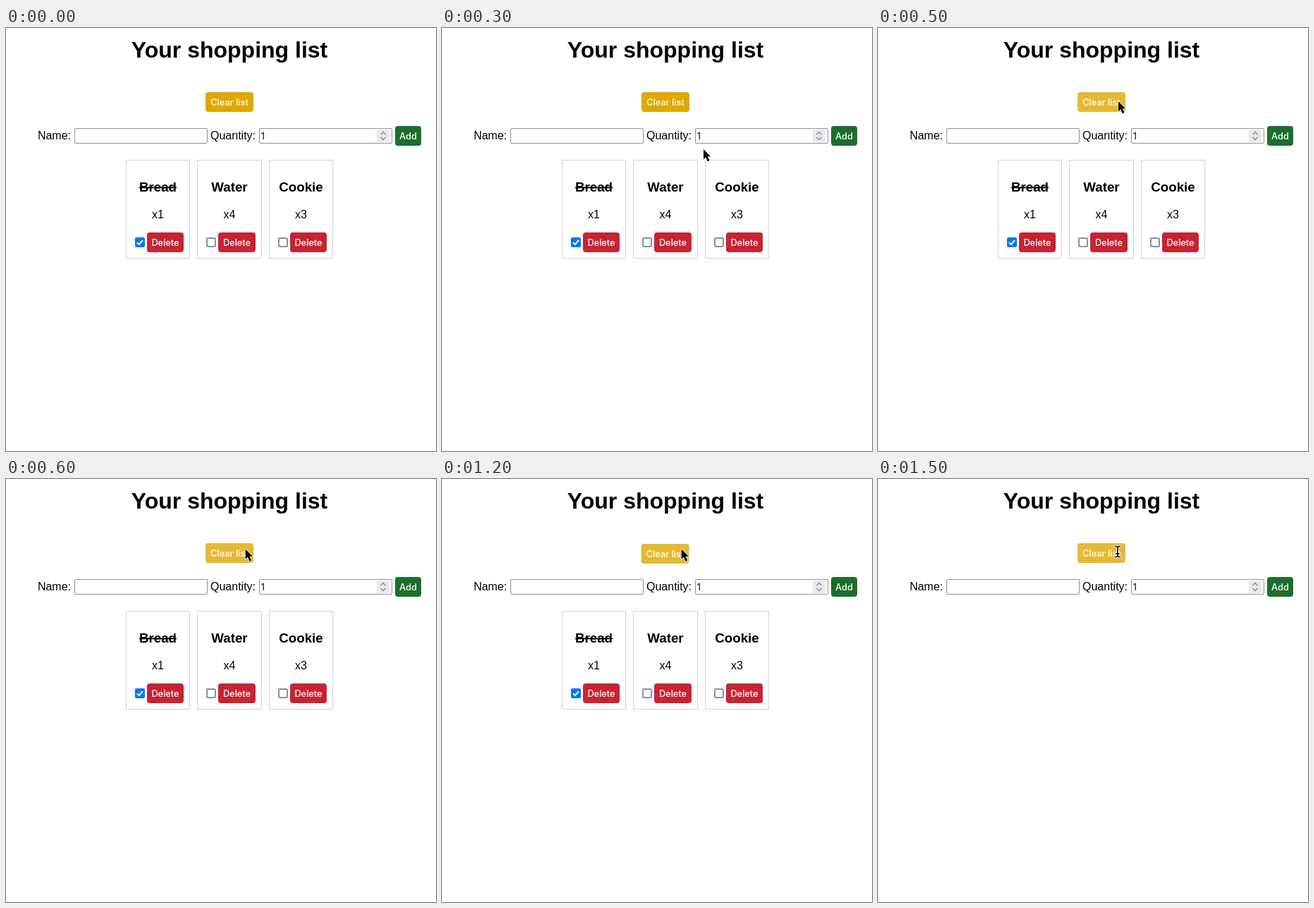
An HTML page for the animation above (1850 ms loop, 610 px wide and 600 px high).

```html
<!DOCTYPE html>
<html lang="en">
<head>
<meta charset="utf-8">
<title>Shopping list</title>
<style>
  html, body { margin: 0; width: 100%; height: 100%; overflow: hidden; background: #fff; }
  svg { display: block; width: 610px; height: 600px; }
  text { font: 16px "Liberation Sans", Arial, sans-serif; }
  .title { font-size: 32px; font-weight: bold; }
  .item { font-size: 18.72px; font-weight: bold; }
  .done { text-decoration: line-through; }
  .ui { font: 500 12.8px Inter, Roboto, sans-serif; }
  .value { font-weight: 400; }
  .mid { text-anchor: middle; }
  .field { fill: #fff; stroke: #8f8f9d; }
</style>
</head>
<body>
<svg id="stage" viewBox="0 0 610 600" xmlns="http://www.w3.org/2000/svg"></svg>
<script>
const LOOP = 1850;
const stage = document.getElementById('stage');

function add(parent, tag, attrs, content) {
  const el = document.createElementNS('http://www.w3.org/2000/svg', tag);
  for (const key in attrs) el.setAttribute(key, attrs[key]);
  if (content) el.textContent = content;
  parent.appendChild(el);
  return el;
}

const label = (parent, x, y, content, cls = '') =>
  add(parent, 'text', { x, y, class: cls }, content);

function button(parent, x, y, width, fill, content) {
  const g = add(parent, 'g');
  add(g, 'rect', { x, y, width, height: 28, rx: 4, fill });
  label(g, x + width / 2, y + 18.6, content, 'ui mid').setAttribute('fill', '#fff');
  return g;
}

const field = x =>
  add(stage, 'rect', { x: x + .5, y: 142.5, width: 188, height: 21, rx: 1.5, class: 'field' });

function checkbox(parent, x, y, checked) {
  if (!checked) {
    add(parent, 'rect', { x: x + 1, y: y + 1, width: 12, height: 12, rx: 1.5,
      fill: '#fff', stroke: '#8f8f9d', 'stroke-width': 2 });
    return;
  }
  add(parent, 'rect', { x, y, width: 14, height: 14, rx: 2, fill: '#0075ff' });
  add(parent, 'path', { d: `M${x + 3} ${y + 7.2}l2.8 2.8l5.2-6`,
    fill: 'none', stroke: '#fff', 'stroke-width': 2 });
}

function card(parent, x, width, name, count, checked) {
  const g = add(parent, 'g');
  const center = x + width / 2;
  add(g, 'rect', { x: x + .5, y: 187.5, width: width - 1, height: 139, fill: '#fff', stroke: '#d3d3d3' });
  label(g, center, 232, name, checked ? 'item mid done' : 'item mid');
  label(g, center, 270, 'x' + count, 'mid');
  checkbox(g, x + 13, 297, checked);
  return button(g, x + 30, 290, width > 91 ? 53 : 52, '#c82333', 'Delete');
}

label(stage, 317, 42, 'Your shopping list', 'title mid');
const clearButton = button(stage, 283, 91, 68, '#e0a800', 'Clear list');

label(stage, 44.9, 158, 'Name:');
field(97);
label(stage, 290, 158, 'Quantity:');
field(359);
label(stage, 361.8, 157.8, '1', 'ui value');
add(stage, 'rect', { x: 526, y: 144, width: 18, height: 18, rx: 1, fill: '#e9e9ed' });
add(stage, 'path', { d: 'M531.5 151l3.5-3.5l3.5 3.5M531.5 155l3.5 3.5l3.5-3.5',
  fill: 'none', stroke: '#8f8f94', 'stroke-width': 1.5 });
button(stage, 552, 139, 37, '#1b6e2d', 'Add');

const cards = add(stage, 'g');
card(cards, 170, 91, 'Bread', 1, true);
card(cards, 271, 92, 'Water', 4, false);
const lastDelete = card(cards, 373, 91, 'Cookie', 3, false);

const arrow = add(stage, 'path', {
  d: 'M0 0V14.2L3.2 11.2L5.8 17.2L8.5 16L5.9 10.2H10.2Z',
  fill: '#000', stroke: '#fff', 'stroke-width': 1.6, 'stroke-linejoin': 'round', 'paint-order': 'stroke'
});

const beam = add(stage, 'g', { fill: 'none' });
for (const [stroke, width] of [['#fff', 3.6], ['#000', 1.6]]) {
  add(beam, 'path', {
    d: 'M336.5 95.5H338.5L340 97L341.5 95.5H343.5M340 97V109M336.5 110.5H338.5L340 109L341.5 110.5H343.5M338 106H342',
    stroke, 'stroke-width': width, 'stroke-linecap': 'square'
  });
}

// Pointer stops: start time, x, y
const stops = [[100, 430, 298], [200, 414.5, 253.5], [300, 371, 172],
  [400, 345, 117.5], [500, 341, 104], [600, 339.7, 99.5]];

const show = (el, on) => el.setAttribute('visibility', on ? 'visible' : 'hidden');
const hover = (el, on) => el.setAttribute('opacity', on ? .8 : 1);

function render(t) {
  const stop = stops.filter(s => s[0] <= t).pop();
  if (stop) arrow.setAttribute('transform', `translate(${stop[1]} ${stop[2]})`);
  show(arrow, stop && t < 1500);
  show(beam, t >= 1500);
  show(cards, t < 1300);
  hover(lastDelete, t >= 100 && t < 300);
  hover(clearButton, t >= 500);
  const pressed = t >= 1100 && t < 1300;
  clearButton.setAttribute('transform', pressed ? 'translate(-.5 1)' : '');
}

const start = performance.now();
function tick() {
  render((performance.now() - start) % LOOP);
  requestAnimationFrame(tick);
}
tick();
</script>
</body>
</html>
```
